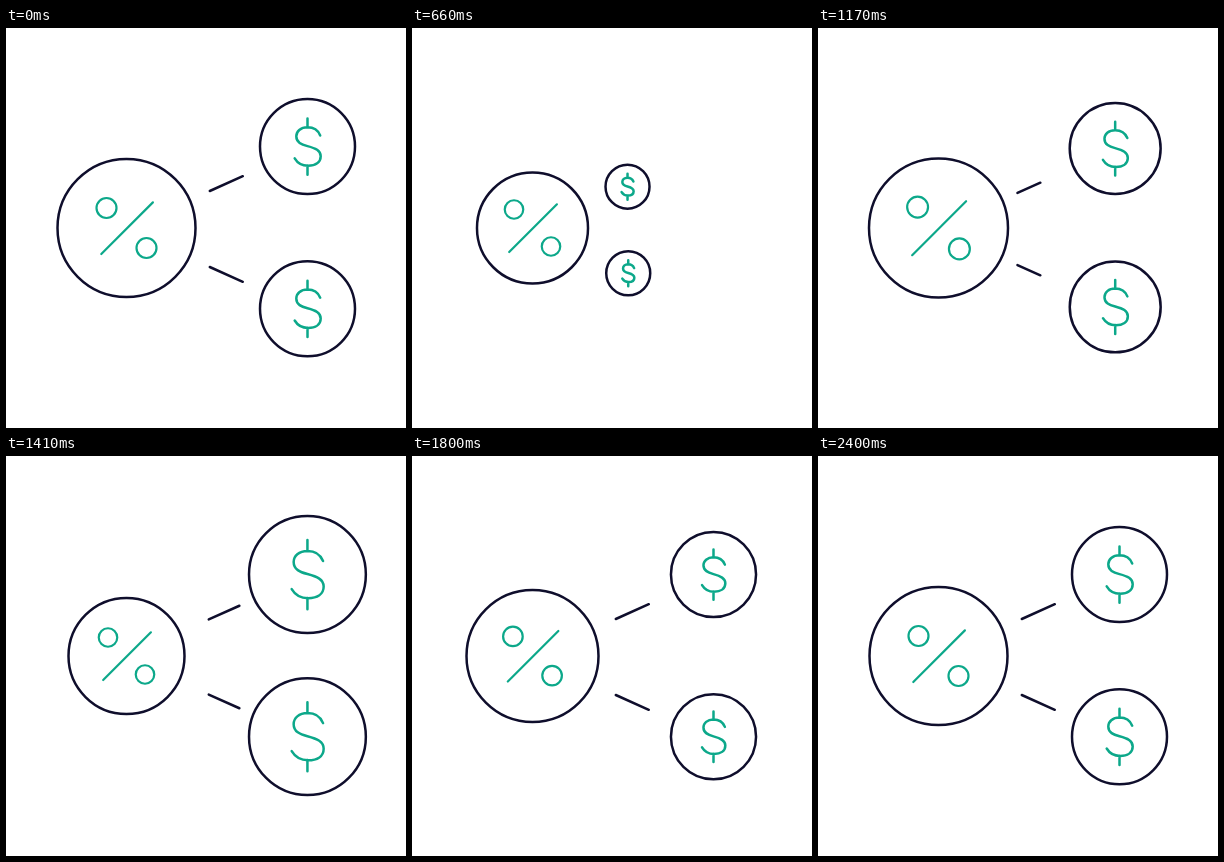
Animation, 400 px wide and 400 px high, one loop 4.43 s. Source, as an HTML page with a canvas:

```html
<!DOCTYPE html>
<html lang="en">
<head>
<meta charset="utf-8">
<title>Percent split</title>
<style>
html, body { margin: 0; width: 100%; height: 100%; overflow: hidden; background: #fff; }
canvas { display: block; width: 100vmin; height: 100vmin; }
</style>
</head>
<body>
<canvas id="stage"></canvas>
<script>
const SIZE = 400, LOOP = 4430, STEP = 30, END = 2400, CUT = 450;
const NAVY = '#0f0e2c', TEAL = '#0ca88a';
const THICK = 2.5, THIN = 2.2;
const HUB = { x: 120.5, y: 200 };
const COINS = [
  { x: 301.5, y: 118.5, fromX: 120.5, fromY: 203, speed: 1, slope: -0.58 },
  { x: 301.5, y: 280.7, fromX: 122, fromY: 206, speed: 1.08, slope: 0.4 }
];
const LINKS = [
  { y: 163, slope: -0.448 },
  { y: 239, slope: 0.448 }
];
// Keys are [time, value]
const HUB_R = [[0, 69], [520, 46.5], [930, 81], [1410, 58], [2010, 69]];
const SIGN = [[0, 1], [520, 0.84], [930, 1.165], [1410, 0.925], [2010, 1]];
const COIN_R = [[CUT, 22], [780, 22], [1440, 58.6], [1920, 39.8], [2400, 47.5]];
const DOLLAR = new Path2D(
  'M0 -28V-19 M0 19V28.2 M12.7 -11C10.5 -16.5 6 -19.2 0 -19.2' +
  'C-7 -19.2 -11.2 -15 -11.2 -10.2C-11.2 -4 -6 -2 0 -0.4' +
  'C8 1.7 13.2 4 13.2 9.8C13.2 16 8 19.2 0.5 19.2C-6 19.2 -10 16.5 -12.8 11.8');

const canvas = document.getElementById('stage');
const ctx = canvas.getContext('2d');

const mix = (a, b, p) => a + (b - a) * p;
const wave = p => (1 - Math.cos(Math.PI * p)) / 2;

function track(keys, t) {
  for (let i = 1; i < keys.length; i++) {
    const [t0, a] = keys[i - 1], [t1, b] = keys[i];
    if (t < t1) return mix(a, b, wave(Math.max(0, t - t0) / (t1 - t0)));
  }
  return keys[keys.length - 1][1];
}

function pen(color, width) {
  ctx.strokeStyle = color;
  ctx.lineWidth = width;
}

function ring(x, y, r, fill) {
  ctx.beginPath();
  ctx.arc(x, y, r, 0, Math.PI * 2);
  if (fill) ctx.fill();
  ctx.stroke();
}

function line(x0, y0, x1, y1) {
  ctx.beginPath();
  ctx.moveTo(x0, y0);
  ctx.lineTo(x1, y1);
  ctx.stroke();
}

function drawLinks(t) {
  let start, tip;
  if (t < CUT) {
    const p = (t / 300) ** 2.5;
    start = 41 * p;
    tip = 33 + 38 * p;
  } else {
    const left = 38 * (Math.max(0, 1800 - t) / 870) ** 3;
    start = -0.3 * left;
    tip = 33 - left;
  }
  if (tip <= start) return;
  pen(NAVY, THICK);
  for (const { y, slope } of LINKS) {
    line(203.8 + start, y + slope * start, 203.8 + tip, y + slope * tip);
  }
}

function drawCoin(coin, t) {
  let { x, y } = coin, r;
  if (t < CUT) {
    const out = 15.5 * (t / 300) ** 3.7;
    x += out * coin.speed;
    y += out * coin.speed * coin.slope;
    r = 47.5 - 0.385 * out;
  } else {
    const left = Math.min(1, Math.max(0, 1500 - t) / 1060) ** 3.2;
    x = mix(x, coin.fromX, left);
    y = mix(y, coin.fromY, left);
    r = track(COIN_R, t);
  }
  pen(NAVY, THICK);
  ring(x, y, r, true);
  const k = r / 47.5;
  const glyph = new Path2D();
  glyph.addPath(DOLLAR, new DOMMatrix([k, 0, 0, k, x, y]));
  pen(TEAL, THICK);
  ctx.stroke(glyph);
}

function drawHub(t) {
  const { x, y } = HUB, k = track(SIGN, t);
  pen(NAVY, THICK);
  ring(x, y, track(HUB_R, t), true);
  pen(TEAL, THIN);
  for (const side of [-20, 20]) ring(x + side * k, y + side * k, 10 * k);
  line(x - 25.2 * k, y + 26 * k, x + 26.4 * k, y - 25.6 * k);
}

function resize() {
  const side = Math.min(innerWidth, innerHeight) * devicePixelRatio;
  canvas.width = canvas.height = Math.round(side) || SIZE;
}

function draw(t) {
  const s = canvas.width / SIZE;
  ctx.setTransform(s, 0, 0, s, 0, 0);
  ctx.fillStyle = '#fff';
  ctx.fillRect(0, 0, SIZE, SIZE);
  ctx.lineCap = ctx.lineJoin = 'round';
  drawLinks(t);
  for (const coin of COINS) drawCoin(coin, t);
  drawHub(t);
}

const begin = performance.now();

function tick() {
  const t = (performance.now() - begin) % LOOP;
  draw(Math.min(END, Math.floor(t / STEP) * STEP));
  requestAnimationFrame(tick);
}

addEventListener('resize', resize);
resize();
tick();
</script>
</body>
</html>
```
